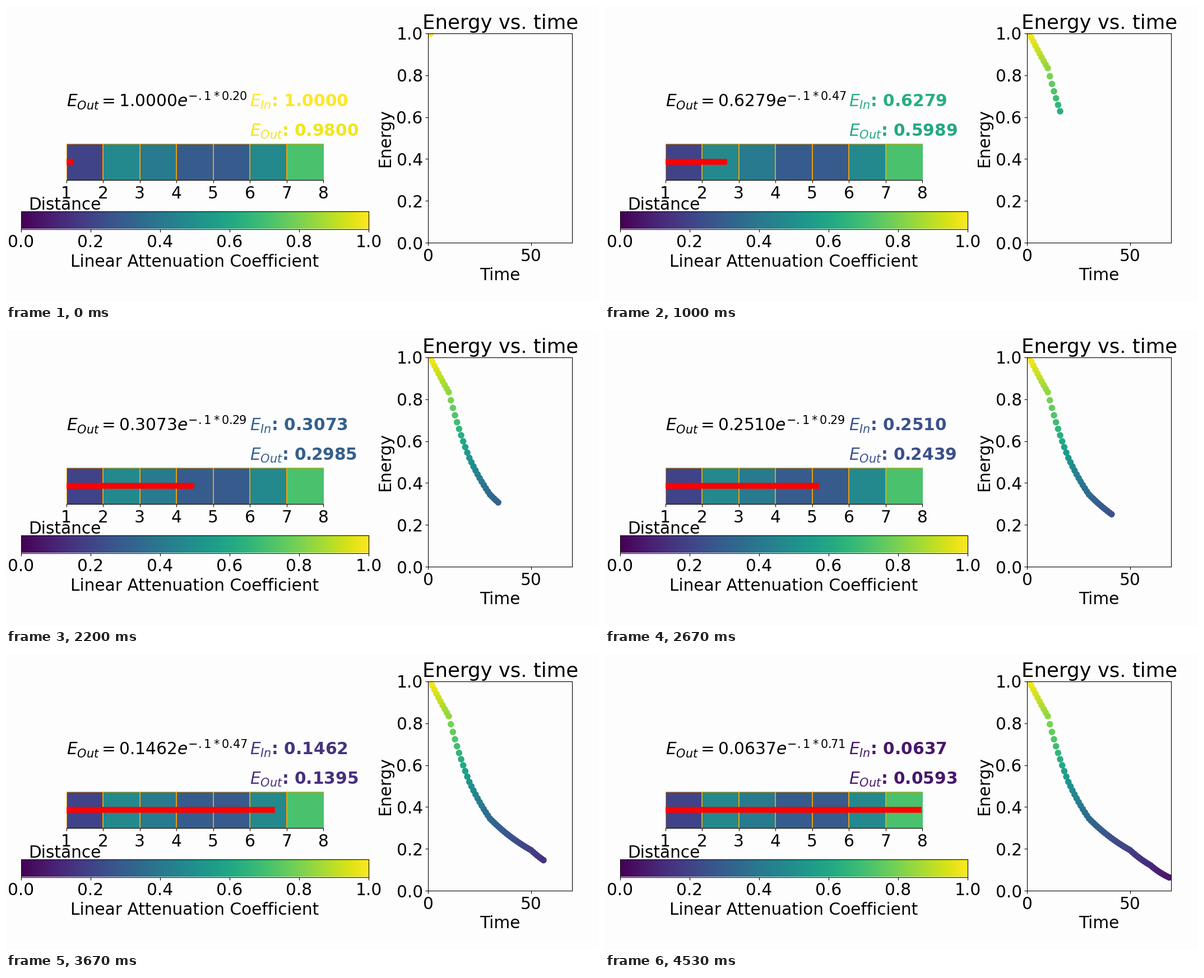
These frames come from a looping animation (1058x529 px, 4590 ms). A matplotlib script:

```python
import matplotlib.pyplot as plt
import numpy as np
from matplotlib.animation import FuncAnimation

W, H, DPI = 1058, 529, 100
LOOP_MS, FRAMES = 4590, 69
STEP = 0.1
MU = [0.2025, 0.4719, 0.40996, 0.28949, 0.28721, 0.470, 0.71424]


def px(n):
    """Pixels to points."""
    return n * 72 / DPI


EM = px(29.6)
plt.rcParams.update({
    "font.family": "DejaVu Sans",
    "font.size": EM,
    "mathtext.fontset": "dejavusans",
    "axes.linewidth": px(1.1),
    "axes.titlepad": px(8.2),
    "axes.labelpad": px(5.4),
    **{f"{a}tick.major.{k}": px(v) for a in "xy"
       for k, v in (("size", 4.8), ("pad", 4.8), ("width", 1.1))},
})

fig = plt.figure(figsize=(W / DPI, H / DPI), dpi=DPI, facecolor="#fdfdfd")
cmap = plt.get_cmap("viridis")


def add_axes(left, top, right, bottom):
    box = [left / W, 1 - bottom / H, (right - left) / W, (bottom - top) / H]
    return fig.add_axes(box, facecolor="none")


# Attenuation and energy at every step along the row of cells
steps = np.arange(FRAMES)
mu = np.array(MU)[(steps + 1) // 10]
energy = np.exp(-STEP * np.concatenate([[0], np.cumsum(mu)]))

# Row of cells
row = add_axes(107.6, 245.6, 566, 311)
row.set(xlim=(1, 8), ylim=(0, 1), xticks=range(1, 9), yticks=[])
row.spines[["left", "top", "right"]].set_visible(False)
row.imshow([MU], cmap=cmap, vmin=0, vmax=1, extent=(1, 8, 0, 1),
           aspect="auto", interpolation="nearest")
row.vlines(range(1, 8), 0, 1, color="orange", lw=px(1.8))
row.hlines(1, 1, 8, color="orange", lw=px(2.4))
beam, = row.plot([], [], color="red", lw=px(10.5), zorder=2.4)

formula = row.text(1, 2, "")
e_in = row.text(6, 2, "", weight="bold")
e_out = row.text(6, 1.2, "", weight="bold")
fig.text(40 / W, 1 - 363.5 / H, "Distance")

# Colour scale
bar = add_axes(26.5, 367, 647, 398.5)
bar.imshow([np.linspace(0, 1, 256)], cmap=cmap, extent=(0, 1, 0, 1),
           aspect="auto", interpolation="nearest")
bar.set(xticks=np.linspace(0, 1, 6), yticks=[],
        xlabel="Linear Attenuation Coefficient")

# Energy plot
plot = add_axes(753.3, 48.8, 1010.3, 423.2)
plot.set(xlim=(0, 70), ylim=(0, 1), xticks=[0, 50],
         yticks=np.linspace(0, 1, 6), xlabel="Time", ylabel="Energy")
plot.set_title("Energy vs. time", fontsize=1.2 * EM)
dots = plot.scatter([], [], s=px(11.5) ** 2, linewidths=0)


def update(i):
    now, after = energy[i], energy[i + 1]
    beam.set_data([1, 1 + STEP * (i + 1)], [0.5, 0.5])
    formula.set_text(rf"$E_{{Out}} = {now:.4f}e^{{-.1*{mu[i]:.2f}}}$")
    e_in.set_text(f"$E_{{In}}$: {now:.4f}")
    e_in.set_color(cmap(now))
    e_out.set_text(f"$E_{{Out}}$: {after:.4f}")
    e_out.set_color(cmap(after))
    seen = energy[:i + 1]
    dots.set_offsets(np.column_stack([steps[:i + 1] + 1, seen]))
    dots.set_facecolor(cmap(seen))
    return beam, formula, e_in, e_out, dots


anim = FuncAnimation(fig, update, frames=FRAMES, init_func=lambda: update(0),
                     interval=LOOP_MS / FRAMES, repeat=True, repeat_delay=0)
plt.show()
```
